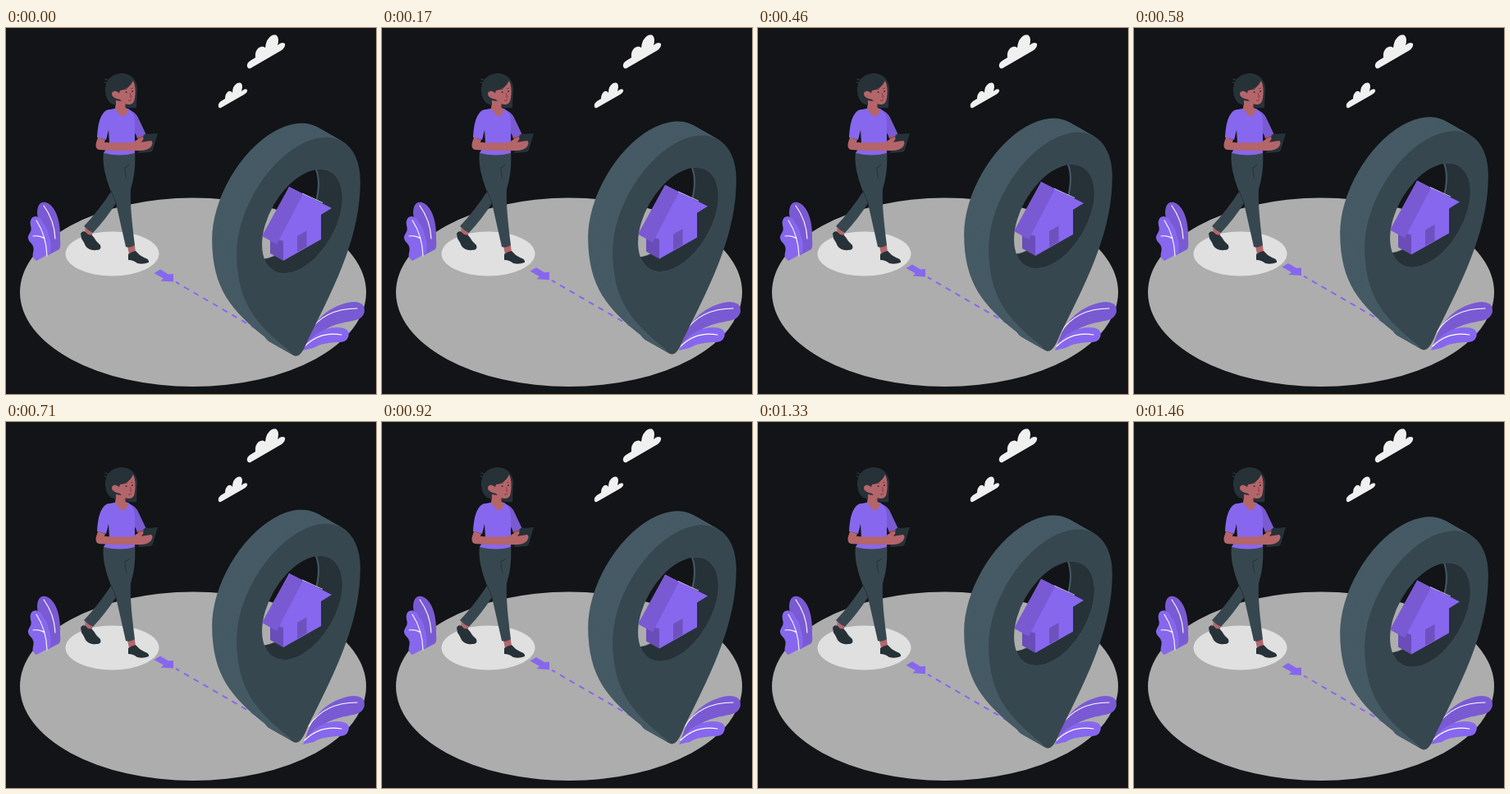
An HTML page for the animation above (1.5 s loop, 451 by 445 pixels).

```html
<!DOCTYPE html>
<html lang="en">
<head>
<meta charset="utf-8">
<title>Map pin</title>
<style>
  html, body { margin: 0; width: 100%; height: 100%; overflow: hidden; background: #121417; }
  svg { display: block; width: 100%; height: 100%; }
  .violet { fill: #8767ee; }
  .plum { fill: #7a5ad3; }
  .dark { fill: #263238; }
  .slate { fill: #37474f; }
  .steel { fill: #455a64; }
  .skin { fill: #b4656a; }
  .cloud { fill: #f0f0f0; }
  .vein { fill: none; stroke: #fff; stroke-width: 1.1; stroke-linecap: round; }
</style>
</head>
<body>
<svg viewBox="0 0 451 445" preserveAspectRatio="none">
  <defs>
    <!-- Drawn flat, then sheared into the isometric plane -->
    <path id="face" transform="matrix(.866 -.5 0 1 356.5 230)" fill-rule="evenodd"
      d="M-87 0A87 87 0 0 1 87 0C87 62 58 102 13 156Q0 180 -13 156C-58 102 -87 62 -87 0Z
         M-51.3 7.6a56.5 56.5 0 0 0 113 0a56.5 56.5 0 0 0 -113 0Z"/>
    <clipPath id="opening">
      <circle cx="5.2" cy="7.6" r="56.5" transform="matrix(.866 -.5 0 1 356.5 230)"/>
    </clipPath>
  </defs>

  <ellipse cx="228" cy="321.3" rx="211" ry="114.7" fill="#adadad"/>
  <ellipse cx="129.5" cy="274.5" rx="57" ry="27" fill="#e0e0e0"/>

  <g class="cloud">
    <path d="M294 47Q293 42 299 39L304 36Q303 28 308 24Q313 21 316 24Q317 13 324 9Q331 6 332 14Q332 18 331 21Q336 16 340 19Q341 23 336 27L298 49Q295 50 294 47Z"/>
    <path d="M259 96Q258 92 262 89L267 86Q267 80 271 77Q275 76 276 79Q276 70 282 67Q288 65 288 72L287 77Q291 73 294 75Q295 78 290 81L262 97Q260 98 259 96Z"/>
  </g>

  <g id="plants">
    <path class="plum" d="M50 277C46 257 39 240 38 225C38 214 43 209 51 213C62 219 67 238 66 258Q67 266 65 269Z"/>
    <path class="violet" d="M37 283Q31 279 33 273Q35 266 30 261Q25 256 28 251Q32 246 30 240Q28 230 36 229Q43 230 46 238Q51 243 52 252Q56 260 54 274Z"/>
    <path class="vein" d="M46 216Q59 234 60 256M37 234Q49 252 50 277M33 253Q41 252 47 256"/>
    <path class="plum" d="M364 390C370 362 386 343 412 335Q430 330 436 338Q439 346 433 352C422 360 398 354 377 377Z"/>
    <path class="violet" d="M362 392C369 375 386 364 404 364Q416 364 418 371Q418 381 408 382C394 382 383 384 375 389Z"/>
    <path class="vein" d="M369 370C382 350 403 341 428 341M364 387C377 374 391 370 409 373"/>
  </g>

  <g id="walker">
    <path class="skin" d="M97 240L107 247L103 254L96 249ZM148 265L157 264L158 274L150 275Z"/>
    <path class="dark" d="M91 250Q93 246 97 248Q101 253 104 251Q107 254 110 259L115 264Q117 270 110 270Q101 271 97 265Q95 260 92 256ZM149 275Q153 272 158 271Q162 276 168 279Q175 281 174 285Q167 288 160 286Q155 282 149 282Z"/>
    <path class="slate" d="M119 151L157 148C158 165 157 180 152 196C151 215 154 240 157 264Q151 268 146 266L134 213Q122 232 106 249Q100 246 95 241Q113 222 128 199C121 181 117 164 119 151Z"/>
    <path d="M151 166L145 170Q145 177 147 183M128 198L135 215" fill="none" stroke="#263238" stroke-width="1"/>
    <path d="M159 132L168 129L173 139L164 143Z" fill="#9a4c50"/>
    <path class="plum" d="M148 99Q158 101 162 111L171 130Q165 132 160 133L154 122Z"/>
    <path class="violet" d="M127 99Q138 96 149 98Q157 103 157 114L157 152Q139 157 119 152L126 140L125 124L122 136L111 133Q112 111 119 103Q122 99 127 99Z"/>
    <path class="skin" d="M134 88L146 90V97L149 99Q147 106 143 108Q136 104 133 98Z"/>
    <path class="dark" d="M168 130Q170 128 173 129L185 128L179 148Q178 151 175 151L161 152Z"/>
    <path class="skin" d="M112 133L121 136L120 139Q140 140 155 139Q162 134 167 133Q169 135 164 139L177 137Q180 139 177 144Q173 149 164 149Q139 150 113 148Q108 146 110 139Z"/>
    <path d="M120 63q3 -2 5 1M120 66l4 1" fill="none" stroke="#263238" stroke-width="1.5"/>
    <path class="dark" d="M121 78C120 64 129 55 142 55C153 56 159 63 160 73L159 97Q147 98 139 94Q123 95 121 78Z"/>
    <path class="skin" d="M139 76Q150 75 155 64Q159 72 157 85Q156 94 149 93Q142 92 139 87Q128 85 129 79Q132 74 138 79Z"/>
    <path class="skin" d="M134 88L146 90L145 97L134 98Z"/>
    <path d="M144 75l4 -1M152 74l3 -1M151 79l2 5l-2 0M149 88q2 1 4 -1" fill="none" stroke="#7d373d" stroke-width=".9"/>
    <g class="dark"><circle cx="146.5" cy="78" r="1"/><circle cx="154" cy="77" r="1"/></g>
  </g>

  <g id="floating">
    <path d="M207 309L320 374.300" fill="none" stroke="#8767ee" stroke-width="2" stroke-dasharray="7 6.5" stroke-dashoffset="2"/>
    <path class="violet" d="M180.500 298L188 293.500L198 299.500L204 299V308.500L188.500 307.500L192 304.500Z"/>
    <g id="side" class="steel"></g>
    <g clip-path="url(#opening)">
      <path class="dark" fill-rule="evenodd" transform="matrix(.866 -.5 0 1 328.5 213)"
        d="M-200 -200H200V200H-200ZM-51.3 7.6a56.5 56.5 0 0 0 113 0a56.5 56.5 0 0 0 -113 0Z"/>
    </g>
    <use href="#face" class="slate"/>
    <g id="house">
      <path d="M322 256L338 252V283L322 274Z" fill="#6a4db8"/>
      <path class="violet" d="M345 193L397 219L384 227V257L338 283V259L331 257Z"/>
      <path class="plum" d="M345 193L362 202L330 263L312 253Z"/>
      <path d="M355 253L366.500 246.500V266L355 272.500Z" fill="#6f51be"/>
      <path d="M361 201L386 212.500" stroke="#d9cef8" stroke-width=".9"/>
    </g>
  </g>
</svg>
<script>
  const LOOP = 1500, RISE = 9.6, DEPTH = 30;
  const floating = document.getElementById('floating');

  // Sweep the face backwards to give the pin its thickness
  document.getElementById('side').innerHTML = Array.from({ length: DEPTH }, (_, i) =>
    `<use href="#face" x="${i - DEPTH}" y="${(i - DEPTH) * 17 / 30}"/>`).join('');

  function draw() {
    const phase = performance.now() % LOOP / LOOP;
    const lift = RISE * (1 - Math.abs(1 - 2 * phase));
    floating.setAttribute('transform', `translate(0 ${-lift})`);
    requestAnimationFrame(draw);
  }
  draw();
</script>
</body>
</html>
```
